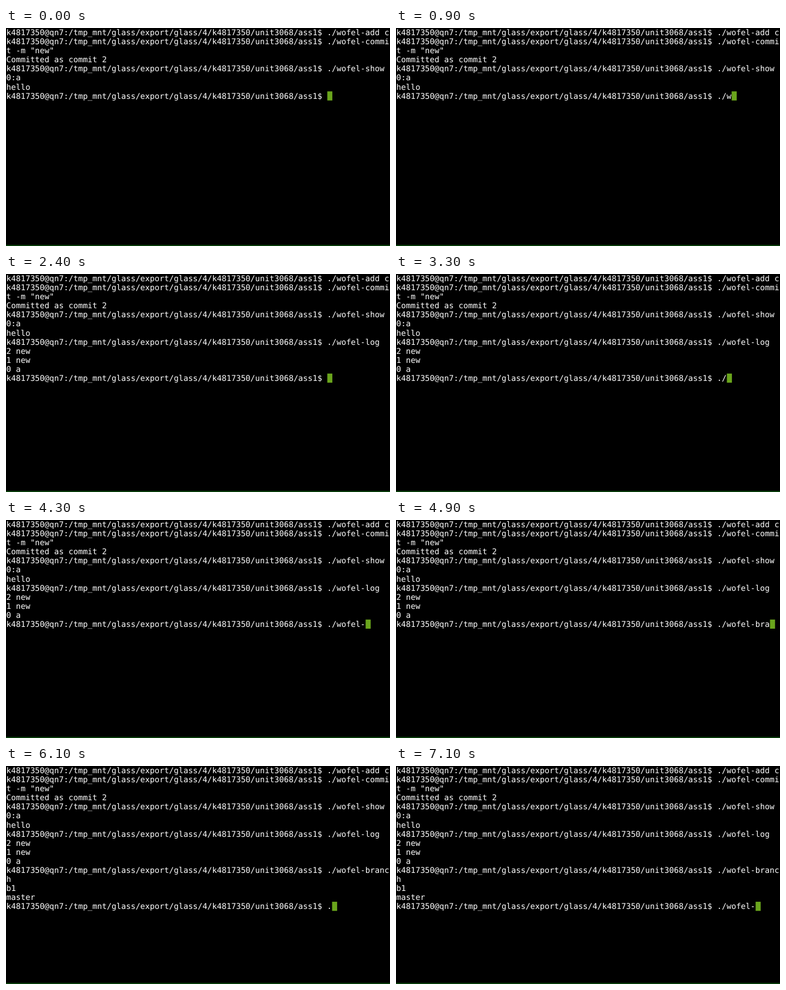
Recreate the animation shown at these times as an HTML page. Size 640 by 363 pixels, loop 7.2 s.

```html
<!DOCTYPE html>
<html lang="en">
<head>
<meta charset="utf-8">
<title>Terminal session</title>
<style>
  html, body { margin: 0; width: 100%; height: 100%; overflow: hidden; background: #000; }
  svg { display: block; width: 640px; height: 363px; }
  text {
    font: 13.264px "DejaVu Sans Mono", "Liberation Mono", monospace;
    fill: #fff;
    white-space: pre;
    text-rendering: geometricPrecision;
  }
</style>
</head>
<body>
<svg viewBox="0 0 640 363" xmlns="http://www.w3.org/2000/svg">
  <rect width="640" height="363" fill="#000"/>
  <rect y="361.3" width="640" height="1.3" fill="#0d5a10"/>
  <rect id="cursor" width="8.4" height="15.2" fill="#6aa51c"/>
  <g id="screen"></g>
</svg>
<script>
const LOOP = 7200, COLS = 80, ROWS = 17;
const CELL = 7.985, LINE = 15.07, LEFT = 0.5, BASE = 12.1;
const TOOL = "./wofel-";
const PROMPT = "k4817350@qn7:/tmp_mnt/glass/export/glass/4/k4817350/unit3068/ass1$ ";

const history = [
  PROMPT + TOOL + "add c",
  PROMPT + TOOL + 'commit -m "new"',
  "Committed as commit 2",
  PROMPT + TOOL + "show 0:a",
  "hello",
  PROMPT
].join("\n");

// One key per 100 ms
const keys = (start, str) => [...str].map((ch, i) => [start + i * 100, ch]);

const events = [
  ...keys(600, "./"),
  ...keys(900, "wofel-"),
  ...keys(1700, "log\n"),
  [2100, "2 new\n1 new\n0 a\n" + PROMPT],
  ...keys(3200, "./"),
  ...keys(3900, "wofe"),
  [4300, "l-"],
  [4600, "b"],
  ...keys(4800, "ranch"),
  [5400, "\n"],
  [5500, "b1\nmaster\n" + PROMPT],
  ...keys(6100, "./"),
  ...keys(6400, "wofel-")
];

const screen = document.getElementById("screen");
const cursor = document.getElementById("cursor");
const rows = Array.from({ length: ROWS }, (_, i) => {
  const row = document.createElementNS("http://www.w3.org/2000/svg", "text");
  row.setAttribute("x", LEFT);
  row.setAttribute("y", BASE + i * LINE);
  return screen.appendChild(row);
});

function wrap(text) {
  const out = [];
  for (const line of text.split("\n")) {
    let at = 0;
    do {
      out.push(line.slice(at, at + COLS));
      at += COLS;
    } while (at < line.length);
  }
  // A full last line sends the cursor to the next row
  if (out[out.length - 1].length === COLS) out.push("");
  return out;
}

let shown = null;
function draw(time) {
  const text = history + events.filter(e => e[0] <= time).map(e => e[1]).join("");
  if (text === shown) return;
  shown = text;
  const lines = wrap(text), last = lines.length - 1;
  rows.forEach((row, i) => { row.textContent = lines[i] || ""; });
  cursor.setAttribute("x", LEFT + lines[last].length * CELL);
  cursor.setAttribute("y", last * LINE);
}

const begin = performance.now();
function tick() {
  draw((performance.now() - begin) % LOOP);
  requestAnimationFrame(tick);
}
draw(0);
tick();
</script>
</body>
</html>
```
